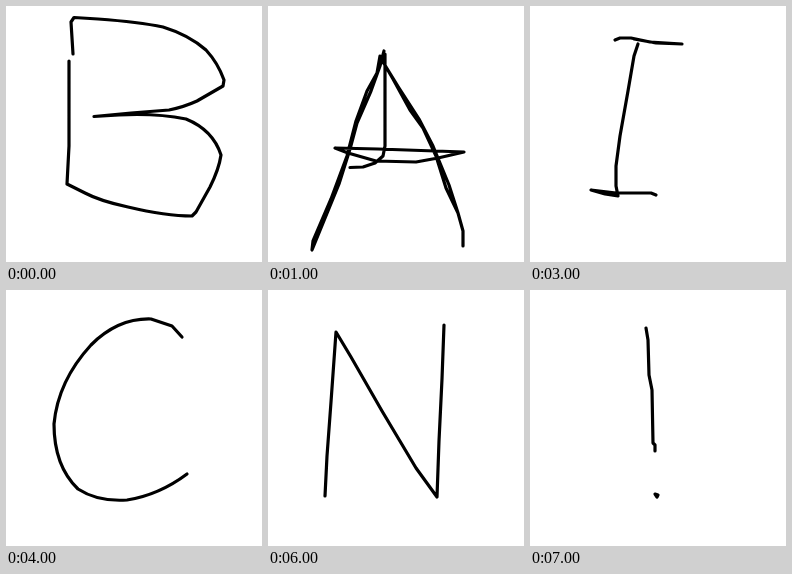
An HTML page for the animation above (8000 ms loop, 256 by 256 pixels).

```html
<!DOCTYPE html>
<html lang="en">
<head>
<meta charset="utf-8">
<title>Handwritten letters</title>
<style>
  html, body { margin: 0; height: 100%; overflow: hidden; background: #fff; }
  svg { display: block; width: 100%; height: 100%; }
  path {
    fill: none; stroke: #000; stroke-width: 3.2;
    stroke-linecap: round; stroke-linejoin: round;
    visibility: hidden;
  }
</style>
</head>
<body>
<svg viewBox="0 0 256 256">
  <!-- B -->
  <path d="M67 48 L65 16 L68 11.5 L92 13 Q133 16 157 21 Q183 29 200 44 Q212 57 218 74 L217 80 L191 95
    Q178 101 163 104 L125 107 L88 110.500 L113 109 Q150 107 180 113 Q207 124 215 149
    Q213 163 204 181 L190 206 L186 210 Q160 210 122 201 Q94 195 79 187 L61 178 L63 140 L63 55"/>
  <!-- A -->
  <path d="M116 45 L112 60 L103 85 L89 117 L82 143 L71 178 L44 244 L45 235 L63 193 L79 150 L88 115 L99 85 L109 67 L112 50
    M117 48 L117 140 L115 150 L107 157 L95 161 L82 161.500
    M114 54 L125 73 L142 104 L155 122 L168 150 L178 182 L190 207 L195 225 L195 240
    M115 56 L131 82 L151 113 L165 140 L181 179 L190 207
    M67 142 L110 143 L196 146 L170 152 L148 156 L108 155 L80 147 Z"/>
  <!-- D -->
  <path d="M51 238 L55 220 L60 185 L61 140 L66 100 L74 55 L77 20 L80 9 L82 20 L85 41 L79 52 L72 87 L65 117 L62 147
    L61 180 L66 204 L67 222 L55 205 L54 196 L72 208 L128 214
    M68 56 L65 72 L68 92 L63 125 L66 158 L65 195
    M72 56 L74 33 L92 22 L108 17 L123 17 L138 27 L150 45 L157 70 L160 95 L166 118 L165 180 L158 200 L148 211 L132 216
    M108 18 L125 19 L140 30 L153 52 L158 80 L164 113 L149 150 L147 182 L141 197 L131 212 L118 217 L100 217 L80 212 L68 196 L60 180"/>
  <!-- I -->
  <path d="M85 34 L90 32 L101 32 L120 36 L152 38 L126 37 L104 33
    M108 38 L104 50 L98 85 L90 130 L86 160 L86 180 L88 190 L75 188 L61 184 L86 187 L121 187 L126 189"/>
  <!-- C -->
  <path d="M176 47 L166 36 L145 29 Q112 28 85 55 Q52 91 48 134 Q48 176 72 199
    Q92 212 121 210 Q153 205 181 184"/>
  <!-- O -->
  <path d="M118 47 L112 48 Q85 62 62 84 Q49 101 43 122 L40 145 L36 165 L36 180 L43 196 L52 202 L57 207 L66 209 L108 209
    L130 202 L156 190 L167 180 Q170 169 166 150 L161 115 L156 75 L150 47 L147 39 L144 28 L137 22 L130 22"/>
  <!-- N -->
  <path d="M57 206 L59 166 L63 112 L68 42 L83 67 L114 121 L148 178 L169 207 L171 151 L174 89 L176 35"/>
  <!-- ! -->
  <path d="M116 38 L118 50 L119 85 L122 100 L123 153 L125 155 L125 161 M125 204 L128 205 L127 207 Z"/>
</svg>
<script>
  const letters = document.querySelectorAll("path");
  const letterTime = 1000;

  function draw() {
    const current = Math.floor(performance.now() / letterTime) % letters.length;
    letters.forEach((letter, i) => {
      letter.style.visibility = i === current ? "visible" : "hidden";
    });
    requestAnimationFrame(draw);
  }
  draw();
</script>
</body>
</html>
```
